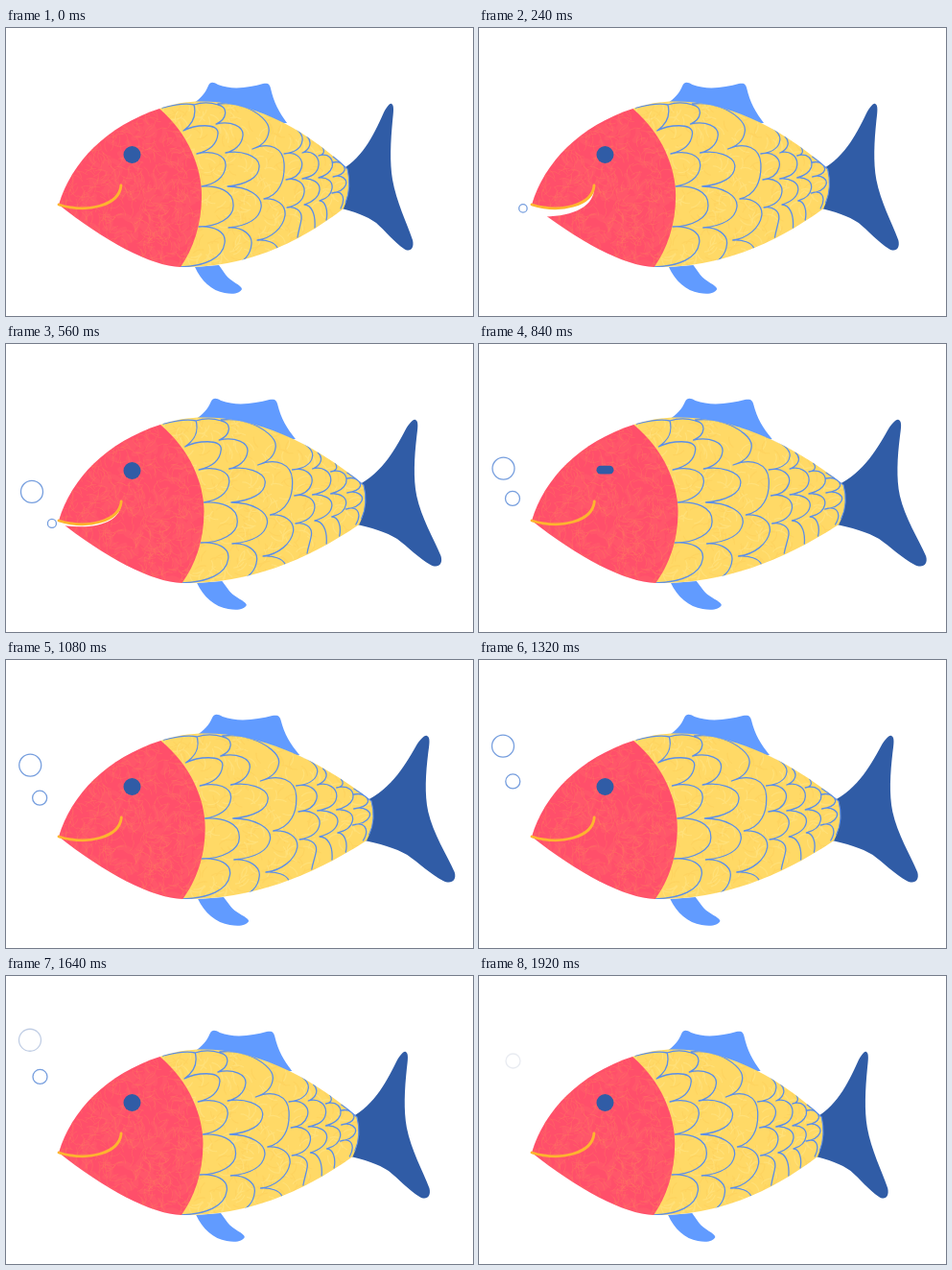
Animation of 487 by 300 pixels, one loop 1960 ms. Source, as an HTML page with a canvas:

```html
<!DOCTYPE html>
<html lang="en">
<head>
<meta charset="utf-8">
<title>Fish</title>
<style>
html, body { margin: 0; width: 100%; height: 100%; overflow: hidden; background: #fff; }
canvas { display: block; width: 487px; height: 300px; }
</style>
</head>
<body>
<canvas id="stage"></canvas>
<script>
const LOOP = 1960, W = 487, H = 300;
const NOSE = 55, LENGTH = 369, STRETCH = 48;
const BLUE = '#619bff', NAVY = '#305ca6', LINE = '#5b8ee8';

const canvas = document.getElementById('stage');
const ctx = canvas.getContext('2d');
const dpr = window.devicePixelRatio || 1;
canvas.width = W * dpr;
canvas.height = H * dpr;

// Shapes at rest; every coordinate is an absolute "x y" pair.
const tail = 'M345 150 C371 138 383 112 393 90 C397 82 400 78 402 79 C405 80 404 88 403 97 ' +
  'C401 118 400 140 403 158 C407 181 418 203 424 221 C426 230 421 234 415 230 ' +
  'C405 223 395 211 386 203 C376 196 364 191 345 187 Z';
const backFin = 'M195 79 C203 73 208 68 211 60 C213 56 216 56 221 59 C236 65 254 62 268 58 ' +
  'C274 57 275 59 276 63 C279 77 285 88 293 99 L250 100 Z';
const bellyFin = 'M197 249 C203 263 215 274 228 276 C238 278 244 276 246 272 C246 268 234 264 229 257 L222 247 Z';
const body = 'M160 84 C215 64 290 84 356 147 C359 160 358 174 352 188 C300 228 245 250 182 249 Z';
const head = 'M55 184 C68 140 105 102 160 84 C190 110 204 145 204 175 C204 205 195 230 182 249 C151 248 103 222 55 184 Z';
const mouth = 'M55 184 C85 193 118 185 120 164';
const scales = [
  'M163 83 C175 80 188 78 196 80 C199 92 195 100 185 107 C196 101 222 98 221 110 C220 122 212 128 199 131',
  'C215 127 230 132 229 144 C228 156 217 163 204 165 C222 164 237 170 237 184 C238 198 220 207 201 207',
  'C217 206 230 212 228 224 C226 240 207 248 182 249',
  'M196 80 C205 77 215 78 221 80 C232 82 231 95 219 100 C235 96 248 103 247 112 C246 122 238 128 229 130',
  'C245 127 263 133 264 143 C265 156 250 163 231 165 C252 165 268 175 266 187 C264 200 250 206 232 208',
  'C246 207 257 215 256 225 C255 237 247 244 239 246',
  'M221 79 C231 78 241 79 248 82 C262 87 276 98 274 108 C273 117 266 123 257 126',
  'C275 118 289 125 290 141 C291 159 285 174 269 178 C282 177 292 184 291 195 C289 208 277 219 262 221',
  'C272 220 281 224 283 229',
  'M288 97 C302 102 310 110 309 117 C308 126 299 130 290 131 C302 128 311 136 308 146 C306 153 300 157 292 158',
  'C303 155 312 162 311 171 C310 180 303 185 293 187 C302 185 309 191 308 199 C307 206 305 211 304 218',
  'M314 113 C319 118 318 126 309 130 C318 127 327 133 326 143 C325 152 318 155 309 157',
  'C319 156 328 161 327 169 C326 177 320 181 311 184 C318 184 323 193 322 208',
  'M330 124 C333 129 331 132 326 133 C336 130 342 136 340 145 C338 151 333 154 326 156',
  'C335 155 341 160 340 167 C339 174 334 178 327 180 C333 180 336 190 334 200',
  'M341 140 C349 138 354 143 353 148 C352 152 347 154 341 155 C350 152 357 158 354 164 C352 169 346 171 340 172',
  'C350 168 355 176 349 188'
].join(' ');
const rump = 'M341 134 C348 139 352 143 356 147 C359 160 358 172 354 182';

// Bubble tracks: [time, value]
const bubbles = [
  {
    from: 200,
    x: [[200, 50], [240, 46], [400, 34], [560, 27], [840, 25.5], [1320, 25]],
    y: [[200, 188], [240, 188], [400, 172], [560, 154], [840, 129.7], [1320, 89.7], [1640, 66.8], [1820, 55]],
    r: [[200, 3], [240, 4.2], [560, 11.5]],
    ink: [[1400, 1], [1640, .4], [1820, 0]]
  },
  {
    from: 530,
    x: [[530, 50], [560, 48], [700, 39], [840, 35], [1640, 35.5]],
    y: [[530, 187], [560, 187], [840, 161], [1320, 126.5], [1640, 105], [1920, 88.5]],
    r: [[530, 3.5], [560, 4.5], [840, 7.5]],
    ink: [[1680, 1], [1920, .2], [1960, 0]]
  }
];
const jaw = [[60, 0], [240, 1], [560, .42], [700, 0]];
const eyeHeight = [[790, 18], [840, 9], [880, 2], [970, 18]];

function track(keys, t) {
  if (t <= keys[0][0]) return keys[0][1];
  for (let i = 1; i < keys.length; i++) {
    const [t0, a] = keys[i - 1], [t1, b] = keys[i];
    if (t < t1) return a + (b - a) * (t - t0) / (t1 - t0);
  }
  return keys[keys.length - 1][1];
}

let seed = 7;
function rand() {
  seed = (seed * 16807) % 2147483647;
  return seed / 2147483647;
}

// Fine curved fibres that give the paper grain.
function fibres(count, x, y, w, h) {
  let d = '';
  for (let i = 0; i < count; i++) {
    let px = x + rand() * w, py = y + rand() * h, a = rand() * 7;
    const pair = n => (px + Math.cos(a) * n).toFixed(1) + ' ' + (py + Math.sin(a) * n).toFixed(1);
    d += 'M' + pair(0);
    a += .5;
    d += 'Q' + pair(6) + ' ';
    a += .5;
    d += pair(11);
  }
  return d;
}
const headBlots = fibres(200, 50, 80, 160, 172);
const headGrain = fibres(650, 50, 80, 160, 172);
const bodyDark = fibres(260, 160, 74, 200, 178);
const bodyLight = fibres(260, 160, 74, 200, 178);

// The body lengthens towards the tail while the nose stays put.
let pull = 0;
function warp(d) {
  return new Path2D(d.replace(/([\d.]+) ([\d.]+)/g, (_, x, y) => {
    const u = Math.max(0, (x - NOSE) / LENGTH);
    return (+x + pull * u ** 2.75).toFixed(2) + ' ' + y;
  }));
}

function fill(d, color) {
  ctx.fillStyle = color;
  ctx.fill(warp(d));
}

function stroke(d, color, width) {
  ctx.strokeStyle = color;
  ctx.lineWidth = width;
  ctx.stroke(warp(d));
}

function clipped(d, paint) {
  ctx.save();
  ctx.clip(warp(d));
  paint();
  ctx.restore();
}

function drawMouth(t) {
  const open = track(jaw, t);
  if (open > 0) {
    const tipX = 55 + 14 * open, tipY = 184 + 12.5 * open;
    ctx.fillStyle = '#fff';
    ctx.beginPath();
    ctx.moveTo(52, 184);
    ctx.lineTo(55, 184);
    ctx.bezierCurveTo(85, 193, 118, 185, 120, 164);
    ctx.bezierCurveTo(121 + open, 184 + 2 * open, 92 + 6 * open, 192 + 4 * open, tipX, tipY);
    ctx.lineTo(52, tipY);
    ctx.fill();
  }
  stroke(mouth, '#fdb52f', 2.8);
}

function drawEye(t) {
  const h = track(eyeHeight, t);
  const mid = 132 - (18 - h) * .09;
  ctx.fillStyle = NAVY;
  ctx.beginPath();
  ctx.roundRect(122.5, mid - h / 2, 18, h, h / 2);
  ctx.fill();
}

function drawBubble(b, t) {
  if (t < b.from) return;
  const ink = track(b.ink, t);
  const mix = (a, z) => Math.round(z + (a - z) * ink);
  ctx.globalAlpha = Math.min(1, ink * 2);
  ctx.strokeStyle = `rgb(${mix(118, 215)},${mix(158, 215)},${mix(222, 220)})`;
  ctx.lineWidth = 1.3;
  ctx.beginPath();
  ctx.arc(track(b.x, t), track(b.y, t), track(b.r, t), 0, Math.PI * 2);
  ctx.stroke();
  ctx.globalAlpha = 1;
}

function draw(t) {
  const u = 1 - Math.abs(t / (LOOP / 2) - 1);
  pull = STRETCH * (u + .045 * Math.sin(Math.PI * u));

  ctx.setTransform(dpr, 0, 0, dpr, 0, 0);
  ctx.fillStyle = '#fff';
  ctx.fillRect(0, 0, W, H);
  ctx.lineCap = ctx.lineJoin = 'round';

  fill(tail, NAVY);
  fill(backFin, BLUE);
  fill(bellyFin, BLUE);
  fill(body, '#ffd966');
  clipped(body, () => {
    stroke(bodyDark, 'rgba(250,190,70,.2)', 1.2);
    stroke(bodyLight, 'rgba(255,240,165,.28)', 1.2);
    stroke(scales, LINE, 1.3);
  });
  stroke(rump, LINE, 1.1);
  fill(head, '#ff4f6a');
  clipped(head, () => {
    stroke(headBlots, 'rgba(252,125,105,.16)', 5);
    stroke(headGrain, 'rgba(250,130,95,.3)', 1);
  });
  drawMouth(t);
  drawEye(t);
  bubbles.forEach(b => drawBubble(b, t));
}

function tick() {
  draw(performance.now() % LOOP);
  requestAnimationFrame(tick);
}
tick();
</script>
</body>
</html>
```
